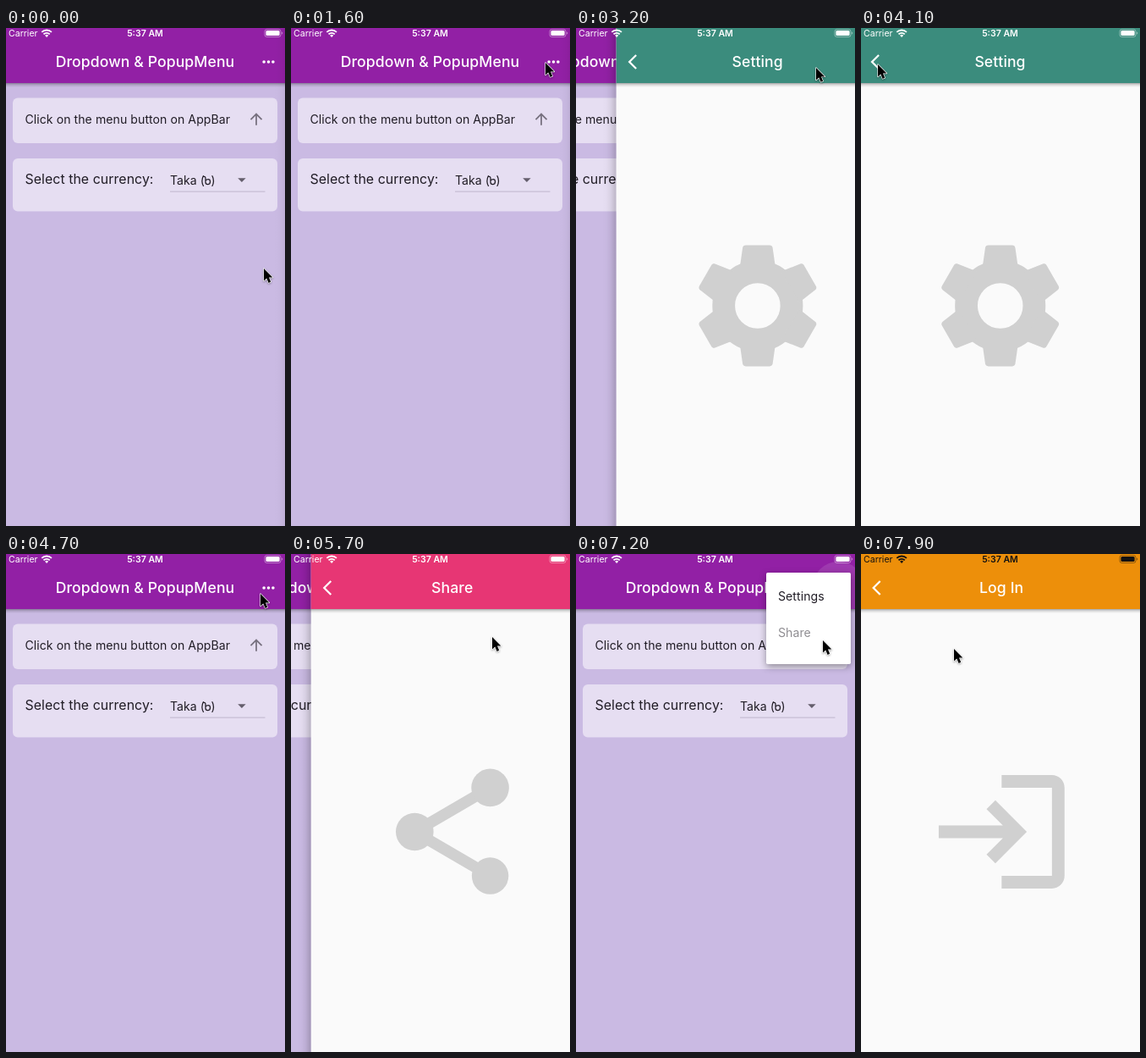
Animation, 330 px wide and 588 px high, one loop 8 s. Source, as an HTML page:

```html
<!DOCTYPE html>
<html lang="en">
<head>
<meta charset="utf-8">
<title>Dropdown and popup menu</title>
<style>
  html, body { margin: 0; width: 100%; height: 100%; overflow: hidden; background: #cabae3; }
  svg { display: block; width: 330px; height: 588px; font-family: Inter, "Open Sans", sans-serif; }
  text { white-space: pre; }
  .title { font-size: 17.6px; font-weight: 500; letter-spacing: .1px; fill: #fff; text-anchor: middle; }
  .body { font-size: 14.1px; letter-spacing: .05px; fill: #211d26; }
  .status { font-size: 10.56px; }
  #panel { filter: drop-shadow(0 3px 4px rgba(0,0,0,.38)); }
</style>
</head>
<body>
<svg viewBox="0 0 330 588">
  <defs>
    <linearGradient id="drop" x2="0" y2="1">
      <stop offset="0" stop-opacity=".34"/>
      <stop offset=".4" stop-opacity=".14"/>
      <stop offset="1" stop-opacity="0"/>
    </linearGradient>
    <linearGradient id="edge">
      <stop offset="0" stop-opacity="0"/>
      <stop offset=".3" stop-opacity=".016"/>
      <stop offset=".6" stop-opacity=".07"/>
      <stop offset="1" stop-opacity=".22"/>
    </linearGradient>
    <clipPath id="menuClip"><rect id="menuBox" y="22"/></clipPath>
    <clipPath id="barClip"><rect x="-3" width="336" height="65"/></clipPath>
  </defs>

  <g id="home">
    <rect x="-2.5" width="335" height="588" fill="#cabae3"/>
    <rect x="-2.5" y="65" width="335" height="5" fill="url(#drop)"/>
    <rect x="-2.5" width="335" height="65" fill="#9220a5"/>
    <circle id="ripple" cx="310.5" cy="40" fill="#fff" clip-path="url(#barClip)"/>
    <text class="title" x="164.5" y="46">Dropdown &amp; PopupMenu</text>
    <g fill="#fff">
      <circle cx="305.1" cy="40" r="1.8"/><circle cx="310.5" cy="40" r="1.8"/><circle cx="315.9" cy="40" r="1.8"/>
    </g>
    <g fill="#e6def2">
      <rect x="8" y="82.5" width="313" height="53.5" rx="6"/>
      <rect x="8" y="154" width="313" height="62.5" rx="6"/>
    </g>
    <text class="body" x="22.5" y="112.8">Click on the menu button on AppBar</text>
    <path transform="translate(285.3 96.8) scale(.893)" fill="#77717f"
      d="M4 12l1.41 1.41L11 7.83V20h2V7.83l5.58 5.59L20 12l-8-8z"/>
    <text class="body" style="font-size:15.9px" x="22.5" y="183.6">Select the currency:</text>
    <text class="body" x="194" y="185">Taka (</text>
    <path fill="none" stroke="#211d26" stroke-width="1.25" stroke-linecap="round"
      d="M233.6 175.4q2.4-.5 2.4 2V182q0 2.7 2.6 2.7q2.9 0 2.9-3.2q0-2.8-2.3-2.8q-1.8 0-3.2 1.7"/>
    <text class="body" x="242.6" y="185">)</text>
    <path d="M274.2 177.2h9.4l-4.7 4.7z" fill="#645e6c"/>
    <rect x="194" y="192.6" width="112.5" height="1" fill="#bfb5cc"/>
    <rect id="residue" x="316" width="16.5" height="588" fill="url(#edge)" opacity=".35"/>
  </g>

  <g id="menu">
    <rect id="panel" y="22" rx="1.8" fill="#fff"/>
    <g clip-path="url(#menuClip)">
      <rect id="press" x="225" width="100" height="43"/>
      <text class="body item" x="239" y="55.4">Settings</text>
      <text class="body item" x="239" y="98.3">Share</text>
      <rect class="item" x="225" y="121.6" width="100" height="1" fill="#dfdfdf"/>
      <text class="body item" x="239" y="155.4">Sign Out</text>
    </g>
  </g>

  <g id="pages"></g>

  <g id="status">
    <text class="status" x="3" y="10.2">Carrier</text>
    <text class="status" x="164.5" y="10.2" text-anchor="middle" font-weight="600">5:37 AM</text>
    <g fill="none" stroke="currentColor" stroke-width="1.9">
      <path d="M42.3 4.9a8.2 8.2 0 0 1 11.6 0M44.5 7.4a5 5 0 0 1 7.2 0"/>
    </g>
    <path d="M48.1 10.9l-2-2.1a2.9 2.9 0 0 1 4 0z"/>
    <rect x="306" y="1.7" width="19" height="8.8" rx="2.5" fill="none" stroke="currentColor" stroke-width=".9" stroke-opacity=".45"/>
    <rect x="307.4" y="3.1" width="16.2" height="6" rx="1.5"/>
    <path d="M326.2 4.6a1.6 1.6 0 0 1 0 3z" fill-opacity=".5"/>
  </g>

  <path id="cursor" d="M0 0V14.6L3.3 11.5 5.6 16.9 8.2 15.8 6 10.5H10.4Z" stroke="#fff" stroke-width="1.3"
    stroke-linejoin="round" paint-order="stroke" style="filter:drop-shadow(0 1px 1px rgba(0,0,0,.35))"/>
</svg>

<script>
const LOOP = 8000, STEP = 100, WIDTH = 335, LEFT = -2.5, SLIDE = 300, MENU = 300;
const MENU_RIGHT = 325, MENU_W = 100, MENU_H = 157;

const el = id => document.getElementById(id);
const clamp = v => Math.max(0, Math.min(1, v));
const put = (node, attrs) => { for (const k in attrs) node.setAttribute(k, attrs[k]); };

const tooth = 'M-2.75-6V-6.65L-2.39-9.19C-2.35-9.43-2.16-9.6-1.92-9.6H1.92C2.16-9.6 2.35-9.43 2.39-9.19L2.75-6.65V-6Z';
const gear = '<circle r="5.4" fill="none" stroke="#d0d0d0" stroke-width="3.6"/>' +
  [0, 60, 120, 180, 240, 300].map(a => `<path d="${tooth}" transform="rotate(${a})"/>`).join('');
const share = '<path d="M6-7L-6 0L6 7" fill="none" stroke="#d0d0d0" stroke-width="1.8"/>' +
  '<circle cx="6" cy="-7" r="3"/><circle cx="-6" r="3"/><circle cx="6" cy="7" r="2.92"/>';
const login = '<path d="M-1-5l-1.4 1.4L.2-1H-10v2H.2l-2.6 2.6L-1 5l5-5zM8 7H0v2h8c1.1 0 2-.9 2-2V-7c0-1.1-.9-2-2-2H0v2h8z"/>';

// open: menu appears, push: page slides in, pop: page slides out
const visits = [
  { title: 'Setting', color: '#3b8c7d', icon: gear, itemY: 29, open: 1950, push: 3080, pop: 4140 },
  { title: 'Share', color: '#e73674', icon: share, itemY: 72, open: 4900, push: 5549, pop: 6370 },
  { title: 'Log In', color: '#ed8f0a', icon: login, itemY: 129, open: 7050, push: 7629, pop: LOOP, dark: true }
];

el('pages').innerHTML = visits.map(v => `<g>
  <rect class="shade" x="${LEFT - 16.7}" width="16.7" height="588" fill="url(#edge)"/>
  <rect x="${LEFT}" width="${WIDTH}" height="588" fill="#fafafa"/>
  <rect x="${LEFT}" y="65" width="${WIDTH}" height="5" fill="url(#drop)"/>
  <rect x="${LEFT}" width="${WIDTH}" height="65" fill="${v.color}"/>
  <path transform="translate(11.4 29.3) scale(.893)" fill="#fff" d="M11.67 3.87L9.9 2.1 0 12l9.9 9.9 1.77-1.77L3.54 12z"/>
  <text class="title" x="164.5" y="46">${v.title}</text>
  <g transform="translate(164.7 328) scale(7.44)" fill="#d0d0d0">${v.icon}</g>
</g>`).join('');
const pages = [...el('pages').children];
const items = [...document.querySelectorAll('.item')];

const bez = (a, b, s) => 3 * a * s * (1 - s) ** 2 + 3 * b * s * s * (1 - s) + s ** 3;

// cubic-bezier(.35, .91, .33, .97)
function glide(u) {
  if (u <= 0 || u >= 1) return clamp(u);
  let lo = 0, hi = 1;
  for (let i = 0; i < 24; i++) {
    const mid = (lo + hi) / 2;
    if (bez(.35, .33, mid) < u) lo = mid; else hi = mid;
  }
  return bez(.91, .97, lo);
}

const cover = (v, t) => t < v.pop ? glide((t - v.push) / SLIDE) : 1 - glide((t - v.pop) / SLIDE);

const menuPhase = (v, t) => t < v.push
  ? clamp((t - v.open) / MENU)
  : clamp((1 - (t - v.push) / MENU) * 1.5);

// time, x, y of the pointer tip
const trail = [
  [0, 305, 284], [1400, 302, 41], [1500, 302, 41], [1600, 301, 41], [2200, 301, 41],
  [2700, 289, 46], [3000, 287, 47], [3150, 287, 47], [3950, 20, 43], [4250, 20, 43],
  [4700, 301, 47], [4800, 304, 39], [4950, 304, 39], [5350, 262, 94], [5550, 260, 95],
  [5700, 238, 98], [6250, 17, 38], [6430, 17, 38], [6880, 304, 37], [7050, 304, 37],
  [7200, 292, 102], [7430, 274, 144], [7620, 274, 144], [7900, 110, 112], [8000, 70, 84]
];

const slope = (i, k) => i < 0 || i >= trail.length - 1 ? 0
  : (trail[i + 1][k] - trail[i][k]) / (trail[i + 1][0] - trail[i][0]);

function tangent(i, k) {
  const a = slope(i - 1, k), b = slope(i, k);
  return a * b > 0 ? 2 * a * b / (a + b) : 0;
}

function along(t, k) {
  let i = 0;
  while (i < trail.length - 2 && trail[i + 1][0] <= t) i++;
  const [p, q] = [trail[i], trail[i + 1]];
  const d = q[0] - p[0], u = (t - p[0]) / d, w = 1 - u;
  return p[k] * (1 + 2 * u) * w * w + q[k] * u * u * (3 - 2 * u)
    + d * u * w * (w * tangent(i, k) - u * tangent(i + 1, k));
}

function drawMenu(t) {
  const v = visits.find(v => t >= v.open - 100 && t < v.push + MENU);
  const p = v ? menuPhase(v, t) : 0;
  const unit = 1 / (items.length + 1.5);
  const w = MENU_W * clamp(p / unit), h = MENU_H * clamp(p / (unit * items.length));
  const box = { x: MENU_RIGHT - w, width: w, height: h };
  put(el('menu'), { opacity: clamp(p * 3), display: p > 0 ? 'inline' : 'none' });
  put(el('panel'), box);
  put(el('menuBox'), box);
  items.forEach((item, i) => item.setAttribute('opacity', clamp((p - (i + 1) * unit) / (1.5 * unit))));
  put(el('press'), { y: v ? v.itemY : 0, opacity: v ? .1 * clamp((t - v.push + 150) / 200) : 0 });
  const age = v ? t - v.open + 100 : 0;
  put(el('ripple'), {
    r: 31 * Math.sqrt(clamp(age / 250)),
    opacity: v ? .13 * clamp((500 - age) / 300) : 0
  });
}

function draw(t) {
  let shown = 0, dark = false;
  visits.forEach((v, i) => {
    const c = cover(v, t);
    shown = Math.max(shown, c);
    if (v.dark && c > .5) dark = true;
    put(pages[i], { transform: `translate(${WIDTH * (1 - c)} 0)`, display: c > 0 ? 'inline' : 'none' });
    pages[i].querySelector('.shade').setAttribute('opacity', c);
  });
  put(el('home'), { transform: `translate(${-WIDTH * shown / 3} 0)` });
  put(el('residue'), { display: t < 1900 ? 'inline' : 'none' });
  drawMenu(t);
  const ink = dark ? '#111' : '#fff';
  put(el('status'), { fill: ink, color: ink });
  put(el('cursor'), { transform: `translate(${along(t, 1)} ${along(t, 2)})` });
}

const start = performance.now();
function tick(now) {
  const t = Math.max(0, now - start) % LOOP;
  draw(Math.floor(t / STEP) * STEP);
  requestAnimationFrame(tick);
}
draw(0);
requestAnimationFrame(tick);
</script>
</body>
</html>
```
